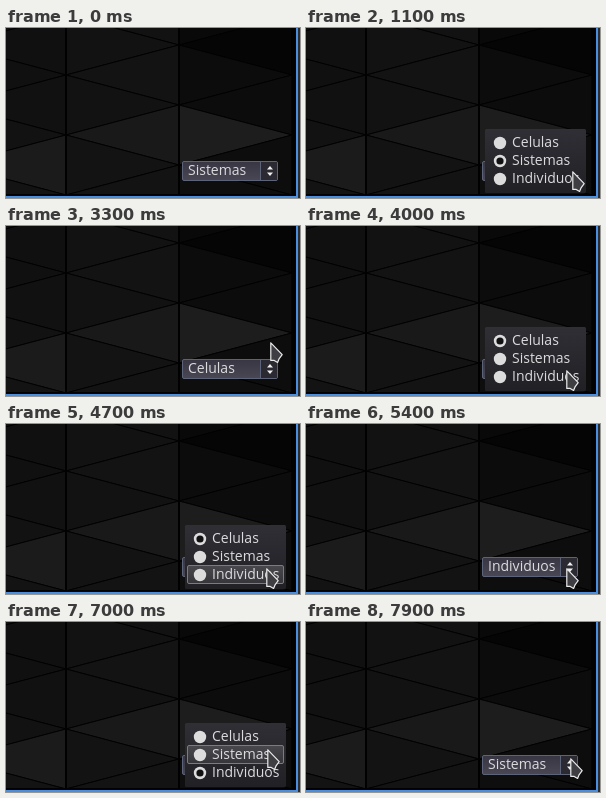
Animation, 294 px wide and 170 px high, one loop 8000 ms. Source, as an HTML page:

```html
<!DOCTYPE html>
<html lang="es">
<head>
<meta charset="utf-8">
<title>Sistemas</title>
<style>
  html, body { margin: 0; width: 100%; height: 100%; overflow: hidden; background: #000; }
  svg { display: block; width: 294px; height: 170px; }
  text { font: 14px "Open Sans", "Noto Sans", sans-serif; fill: #dcdcde; }
</style>
</head>
<body>
<svg viewBox="0 0 294 170">
  <defs>
    <linearGradient id="face" x2="0" y2="1">
      <stop offset="0" stop-color="#373642"/>
      <stop offset="1" stop-color="#4a4754"/>
    </linearGradient>
    <linearGradient id="menuFill" x2="0" y2="1">
      <stop offset="0" stop-color="#302f35"/>
      <stop offset="1" stop-color="#212025"/>
    </linearGradient>
    <linearGradient id="rowFill" x2="0" y2="1">
      <stop offset="0" stop-color="#49484d"/>
      <stop offset="1" stop-color="#36353a"/>
    </linearGradient>
    <clipPath id="desk"><path d="M0 0H285.5V166H0z"/></clipPath>
  </defs>
  <rect width="294" height="170" fill="#020202"/>
  <g id="tiles" clip-path="url(#desk)" stroke="#020202" stroke-width="1"></g>
  <path d="M60 0V167M173 0V167" stroke="#010101" stroke-width="2"/>
  <path d="M292 0H294V170H292z" fill="#2b2d31"/>
  <path d="M291 0V169H0" fill="none" stroke="#4a8edd" stroke-width="2"/>

  <g id="combo">
    <rect x="176.5" y="133.5" width="95" height="19" rx="1.5" fill="url(#face)" stroke="#5d6379"/>
    <path d="M255 134H271V152H255z" fill="#2b2a33"/>
    <path d="M254.5 134V152" stroke="#5d6379"/>
    <path d="M261 141.5L264 138L267 141.5zM261 144.5L264 148L267 144.5z" fill="#f0f0f0"/>
    <text id="label" x="182" y="147"></text>
  </g>

  <g id="menu">
    <rect x="179" y="101" width="101" height="64" rx="1.5" fill="url(#menuFill)"/>
    <rect id="hover" x="181.5" width="96" height="18" rx="1.5" fill="url(#rowFill)" stroke="#7c7b80"/>
  </g>

  <path id="cursor" d="M.8 .8V18.4H4.2L7.6 20.4L9.2 16.6L12.2 12.6z"
        fill="#3f3e43" stroke="#ececec" stroke-width="1.2" stroke-linejoin="round"/>
</svg>
<script>
const NS = "http://www.w3.org/2000/svg";
const byId = id => document.getElementById(id);
function add(parent, tag, attrs) {
  const el = document.createElementNS(NS, tag);
  for (const key in attrs) el.setAttribute(key, attrs[key]);
  return parent.appendChild(el);
}

// Soft light and dark spots shade the wallpaper, one flat tone per tile.
const spots = [
  { x: 186, y: 107, gain: 25 },
  { x: 30, y: 145, gain: 12 },
  { x: 248, y: 17, gain: -6 }
];
const columnTone = [16, 18, 11];
function toneAt(x, y, base) {
  const glow = s => s.gain * Math.exp(-((x - s.x) ** 2 + (y - s.y) ** 2) / 2000);
  return Math.round(spots.reduce((sum, s) => sum + glow(s), base));
}

const tileWidth = 113, halfTile = 30;
columnTone.forEach((base, col) => {
  const left = 60 + (col - 1) * tileWidth;
  for (let i = 0; i < 7; i++) {
    const pointsLeft = (col + i) % 2 === 1;
    const apexX = pointsLeft ? left : left + tileWidth;
    const baseX = pointsLeft ? left + tileWidth : left;
    const middle = (i - 0.5) * 30 + 2 - 30 + halfTile;
    const tone = toneAt((apexX + 2 * baseX) / 3, middle, base);
    add(byId("tiles"), "path", {
      fill: `rgb(${tone},${tone},${tone})`,
      d: `M${baseX} ${middle - halfTile}v${2 * halfTile}L${apexX} ${middle}z`
    });
  }
});

const names = ["Celulas", "Sistemas", "Individuos"];
const rowHeight = 18;
const dots = names.map((name, i) => {
  const y = 119 + i * rowHeight, cx = 194, cy = y - 4;
  add(byId("menu"), "circle", { cx, cy, r: 6.2, fill: "#dcdcdd" });
  add(byId("menu"), "text", { x: 206, y }).textContent = name;
  return add(byId("menu"), "circle", { cx, cy, r: 3.6, fill: "#111113" });
});

const visits = [
  { open: 1100, close: 3300, pick: 0 },
  { open: 4000, close: 5400, pick: 2 },
  { open: 5900, close: 7200, pick: 1 }
];
const entry = { x: 289, y: 31 };
const moves = [
  { from: 200, to: 900, x: 266, y: 143 },
  { from: 1600, to: 2100, x: 264, y: 116 },
  { from: 3400, to: 3900, x: 260, y: 144 },
  { from: 6500, to: 6700, x: 261, y: 127 },
  { from: 7200, to: 7400, x: 261, y: 134 },
  { from: 7700, to: 7900, x: 264, y: 136 }
];
const hoverDelay = 300;

function cursorAt(t) {
  let { x, y } = entry;
  for (const m of moves) {
    const k = Math.min(1, Math.max(0, (t - m.from) / (m.to - m.from)));
    const ease = k * k * (3 - 2 * k);
    x += (m.x - x) * ease;
    y += (m.y - y) * ease;
  }
  return { x: Math.round(x), y: Math.round(y) };
}

const show = (el, on) => el.setAttribute("visibility", on ? "visible" : "hidden");

function draw(now) {
  const t = Math.floor(now % 8000 / 100) * 100;
  const visit = visits.find(v => t >= v.open && t < v.close);
  const choice = visits.filter(v => t >= v.close).pop()?.pick ?? 1;
  const { x, y } = cursorAt(t);

  byId("label").textContent = names[choice];
  byId("menu").setAttribute("display", visit ? "inline" : "none");
  dots.forEach((dot, i) => show(dot, i === choice));
  show(byId("hover"), visit && t >= visit.open + hoverDelay);
  byId("hover").setAttribute("y", 105.5 + Math.floor((y - 105) / rowHeight) * rowHeight);
  show(byId("cursor"), t >= moves[0].from);
  byId("cursor").setAttribute("transform", `translate(${x},${y})`);
}

let start;
function tick(now) {
  start ??= now;
  draw(now - start);
  requestAnimationFrame(tick);
}
draw(0);
requestAnimationFrame(tick);
</script>
</body>
</html>
```
